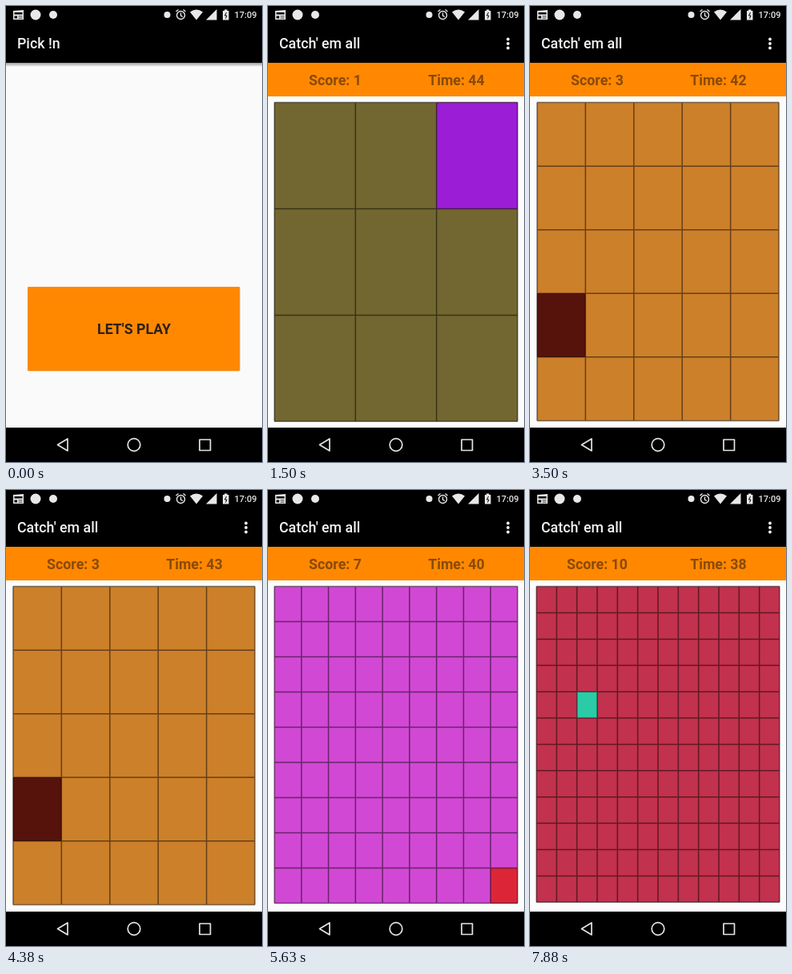
An HTML page that plays this animation: 320x570 px, repeating every 8000 ms.

```html
<!DOCTYPE html>
<html lang="en">
<head>
<meta charset="utf-8">
<title>Odd tile game</title>
<style>
  html, body { margin: 0; width: 100%; height: 100%; overflow: hidden; background: #000; }
  svg { display: block; width: 100vw; height: 100vh; }
  text { font: 500 17.8px Roboto, sans-serif; }
  .label { font-weight: 700; text-anchor: middle; }
  .stat { fill: #8a4a08; }
  .title { fill: #f4f4f4; }
</style>
</head>
<body>
<svg viewBox="0 0 320 570">
  <defs>
    <linearGradient id="shade" x2="0" y2="1">
      <stop stop-color="#999"/><stop offset="1" stop-color="#fafafa"/>
    </linearGradient>
    <clipPath id="buttonClip"><rect x="27" y="351" width="265.5" height="105" rx="1"/></clipPath>
  </defs>

  <g id="home">
    <rect y="71" width="320" height="456" fill="#fafafa"/>
    <rect y="71" width="320" height="5" fill="url(#shade)"/>
    <rect id="shadow" x="27" y="351.5" width="265.5" height="105" rx="2" fill="#bbb"/>
    <g clip-path="url(#buttonClip)">
      <rect x="27" y="351" width="265.5" height="105" fill="#ff8800"/>
      <circle id="ripple" cx="190" cy="415" fill="#000" opacity=".12"/>
    </g>
    <text class="label" x="160" y="410" fill="#2d2018">LET'S PLAY</text>
    <rect width="320" height="71"/>
    <text class="title" x="14" y="53">Pick !n</text>
  </g>

  <g id="game">
    <rect y="71" width="320" height="456" fill="#fcfcfc"/>
    <rect width="320" height="71"/>
    <text class="title" x="14" y="53">Catch' em all</text>
    <g fill="#f4f4f4">
      <circle cx="300" cy="41.5" r="1.9"/><circle cx="300" cy="47" r="1.9"/><circle cx="300" cy="52.5" r="1.9"/>
    </g>
    <rect y="71" width="320" height="42" fill="#ff8800"/>
    <text class="label stat" id="score" x="84" y="99"></text>
    <text class="label stat" id="time" x="235.5" y="99"></text>
    <rect id="board"/>
    <rect id="odd"/>
    <path id="lines" fill="none" stroke="#000" stroke-opacity=".5" stroke-width="1.5"/>
  </g>

  <!-- status bar -->
  <rect width="320" height="22"/>
  <g fill="#e8e8e8">
    <path d="M9 6L22 5V17H9ZM10.500 8V10.500H20.500V8ZM10.500 12.500V15.500H14V12.500ZM15.500 12.500V13.300H20.500V12.500ZM15.500 14.700V15.500H20.500V14.700Z" fill-rule="evenodd"/>
    <circle cx="37" cy="11" r="6.5"/>
    <circle cx="59" cy="11" r="5"/>
    <circle cx="201.5" cy="11" r="4"/>
    <path d="M230 7.5Q238 1.5 246 7.5L238 17.5Z"/>
    <path d="M250 17.5H263.5V4Z"/>
    <path d="M271 6H273V4.5H276.5V6H278.5V17.5H271Z"/>
    <text x="285.5" y="15" style="font-size:11px">17:09</text>
  </g>
  <path d="M275.5 8L273.5 12H276L274.5 15.5" fill="none" stroke="#000"/>
  <g fill="none" stroke="#e8e8e8" stroke-width="1.4">
    <circle cx="218.5" cy="11.5" r="5"/>
    <path d="M218.5 8.5V12L221 13.5M212.5 7L215.5 4.5M224.5 7L221.5 4.5"/>
  </g>

  <!-- navigation bar -->
  <rect y="527" width="320" height="43"/>
  <g fill="none" stroke="#e4e4e4" stroke-width="1.7" stroke-linejoin="round">
    <path d="M77 541V556L64.5 548.5Z"/>
    <circle cx="160" cy="548.5" r="7.8"/>
    <rect x="242" y="542" width="13.5" height="13.5"/>
  </g>
</svg>
<script>
const LOOP = 8000, OPEN = 750;
const SCALE = 320 / 720; // stage pixels per device pixel
const $ = id => document.getElementById(id);
const set = (id, attrs) => {
  for (const key in attrs) $(id).setAttribute(key, attrs[key]);
};
const clamp = v => Math.max(0, Math.min(1, v));

// start ms, score, odd column, odd row, board colour, odd colour
const levels = [
  [0, 0, 1, 1, '#4f8a9c', '#c9a03a'],
  [1500, 1, 2, 0, '#726730', '#9b1dd6'],
  [2130, 2, 1, 2, '#5f9b58', '#b5489a'],
  [2750, 3, 0, 3, '#cc802a', '#56130c'],
  [4500, 4, 3, 2, '#4d79b8', '#c8b43a'],
  [4750, 5, 4, 4, '#8a5cae', '#45b05c'],
  [5250, 6, 5, 3, '#4a9c8c', '#c25a35'],
  [5500, 7, 8, 8, '#d148d4', '#dc2638'],
  [6380, 8, 6, 2, '#dc293f', '#349a84'],
  [7250, 9, 5, 6, '#8d6a3c', '#4569c8'],
  [7630, 10, 2, 4, '#c2314d', '#2bcba6']
];

// start ms, value; the clock briefly ticks back up once
const clock = [[0, 45], [1500, 44], [2500, 43], [3500, 42], [4380, 43],
  [4500, 41], [5250, 40], [6380, 39], [7500, 38]];

const current = (list, t) => list.filter(item => item[0] <= t).pop();

// Tiles are whole device pixels, so the board shrinks slightly as n grows.
function drawBoard([, score, col, row, fill, oddFill]) {
  const n = score + 2;
  const w = Math.floor(684 / n) * SCALE, h = Math.floor(897 / n) * SCALE;
  const width = n * w, height = n * h;
  const x = 160 - width / 2, y = 120.6;
  let d = '';
  for (let i = 0; i <= n; i++) d += `M${x + i * w} ${y}v${height}M${x} ${y + i * h}h${width}`;
  set('board', { x, y, width, height, fill });
  set('odd', { x: x + col * w, y: y + row * h, width: w, height: h, fill: oddFill });
  set('lines', { d });
  $('score').textContent = 'Score: ' + score;
}

let shown;
function frame(now) {
  const t = now % LOOP;
  const pressed = t >= 380;
  set('shadow', { y: pressed ? 353 : 351.5, fill: pressed ? '#aaa' : '#bbb' });
  set('ripple', { r: 260 * clamp((t - 630) / 300) });

  const p = clamp((t - OPEN) / 350);
  set('game', { opacity: clamp(p * 1.7), transform: `translate(0 ${45 * (1 - p) ** 3})` });

  const level = current(levels, t);
  if (level !== shown) drawBoard(shown = level);
  $('time').textContent = 'Time: ' + current(clock, t)[1];
  requestAnimationFrame(frame);
}
requestAnimationFrame(frame);
</script>
</body>
</html>
```
